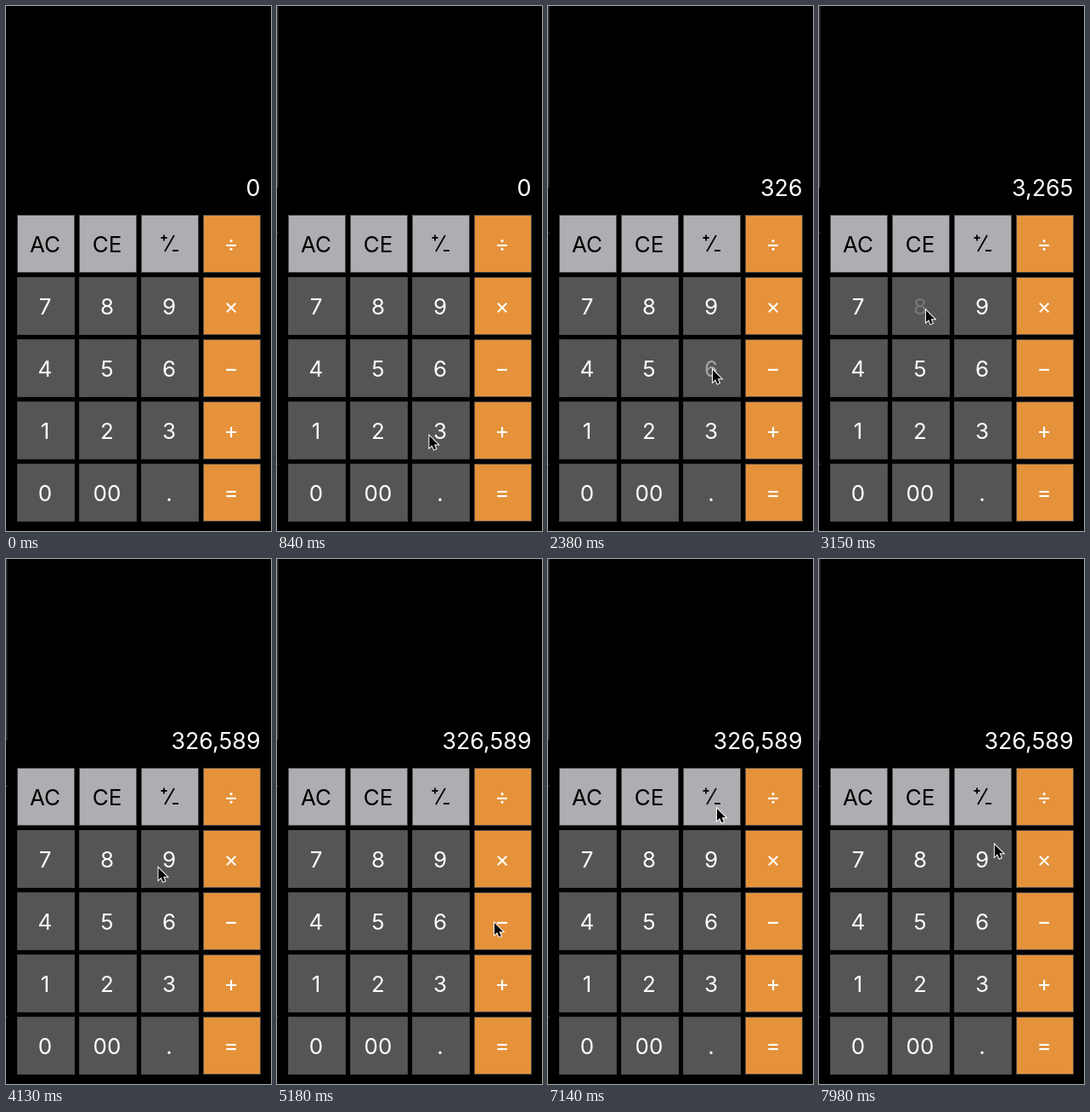
Animation of 312 by 616 pixels, one loop 8 s. Source, as an HTML page with a canvas:

```html
<!DOCTYPE html>
<html lang="en">
<meta charset="utf-8">
<title>Calculator</title>
<style>
  html, body { margin: 0; width: 100%; height: 100%; overflow: hidden; background: #000; }
  canvas { display: block; }
</style>
<canvas width="312" height="616"></canvas>
<script>
const ctx = document.querySelector('canvas').getContext('2d');
const LOOP = 8000, STEP = 70, HOLD = 140, REST = 210, FADE = 210, PITCH = 73;
const KEYS = ['AC', 'CE', '±', '÷', ...'789×456−123+', '0', '00', '.', '='];

const keyX = i => 13 + PITCH * (i % 4);
const keyY = i => 245 + PITCH * Math.floor(i / 4);

// A stop puts the pointer tip at an offset from a key's centre; a click also presses the key.
const stop = (time, key, dx, dy, click = false) => {
  const i = KEYS.indexOf(key);
  return { time, key, click, x: keyX(i) + 34 + dx, y: keyY(i) + 34 + dy };
};
const click = (time, key, dx, dy) => stop(time, key, dx, dy, true);

const stops = [
  stop(0, '1', -61, -18),
  click(910, '3', -8, 7),
  click(1470, '2', 24, 7),
  click(2170, '6', 1, 2),
  click(2520, '5', 2, 2),
  click(3150, '8', 6, 5),
  click(3710, '9', -14, 5),
  stop(4550, '9', -12, 26),
  stop(5180, '−', -10, 2),
  stop(6160, '±', 6, 14),
  ...[0, 1, 2, 3].map(n => click(6440 + 370 * n, '±', 6, 14)),
  stop(LOOP, '9', 14, -16),
];
const clicks = stops.filter(s => s.click);

const arrow = new Path2D('M0 0V14L3.2 11.1L5.4 16.2L7.8 15.2L5.6 10.2H10.2Z');
const plusMinus = new Path2D('M182.5 272h7M186 268.5v7M187 288L198 269M196 287h7');

function pointerAt(t) {
  const next = stops.findIndex(s => s.time > t);
  const a = stops[next - 1], b = stops[next];
  const leave = a.time + REST;
  const u = Math.min(1, Math.max(0, (t - leave) / (b.time - leave)));
  const e = u * u * (3 - 2 * u);
  return [a.x + (b.x - a.x) * e, a.y + (b.y - a.y) * e];
}

function labelAlpha(key, t) {
  const last = clicks.findLast(c => c.key === key && c.time <= t);
  if (!last) return 1;
  return 0.2 + 0.8 * Math.min(1, Math.max(0, (t - last.time - HOLD) / FADE));
}

function displayAt(t) {
  const value = clicks
    .filter(c => c.time + HOLD <= t)
    .reduce((v, { key }) => key === '±' ? -v : v * 10 + Number(key), 0);
  return value.toLocaleString('en-US');
}

function drawKey(key, i, t) {
  const x = keyX(i), y = keyY(i), operator = i % 4 === 3, gray = i < 3;
  ctx.fillStyle = '#4a4a4a';
  ctx.fillRect(x, y, 68, 68);
  ctx.fillStyle = operator ? '#e5923b' : gray ? '#aeaeb2' : '#555';
  ctx.fillRect(x + 1, y + 1, 66, 66);
  ctx.globalAlpha = labelAlpha(key, t);
  ctx.fillStyle = ctx.strokeStyle = gray ? '#000' : '#fff';
  if (key === '±') {
    ctx.lineWidth = 1.8;
    ctx.stroke(plusMinus);
  } else {
    ctx.fillText(key, x + 33, y + (operator ? 42.5 : 43.5));
  }
  ctx.globalAlpha = 1;
}

function drawPointer(t) {
  ctx.save();
  ctx.translate(...pointerAt(t));
  ctx.lineWidth = 2;
  ctx.strokeStyle = '#fff';
  ctx.stroke(arrow);
  ctx.fillStyle = '#000';
  ctx.fill(arrow);
  ctx.restore();
}

function draw(t) {
  ctx.fillStyle = '#000';
  ctx.fillRect(0, 0, 312, 616);
  if (t >= REST) {
    ctx.fillStyle = '#333';
    ctx.fillRect(0, 0, 1.5, 213);
    ctx.fillRect(0, 266, 2, 1);
    ctx.fillRect(0, 537, 2, 1);
  }
  ctx.font = '26.8px Inter, sans-serif';
  ctx.textAlign = 'right';
  ctx.fillStyle = '#fff';
  ctx.fillText(displayAt(t), 299.5, 223);
  ctx.font = '26px Inter, sans-serif';
  ctx.textAlign = 'center';
  KEYS.forEach((key, i) => drawKey(key, i, t));
  drawPointer(t);
}

function frame() {
  const t = performance.now() % LOOP;
  draw(Math.floor(t / STEP) * STEP);
  requestAnimationFrame(frame);
}
frame();
</script>
</html>
```
